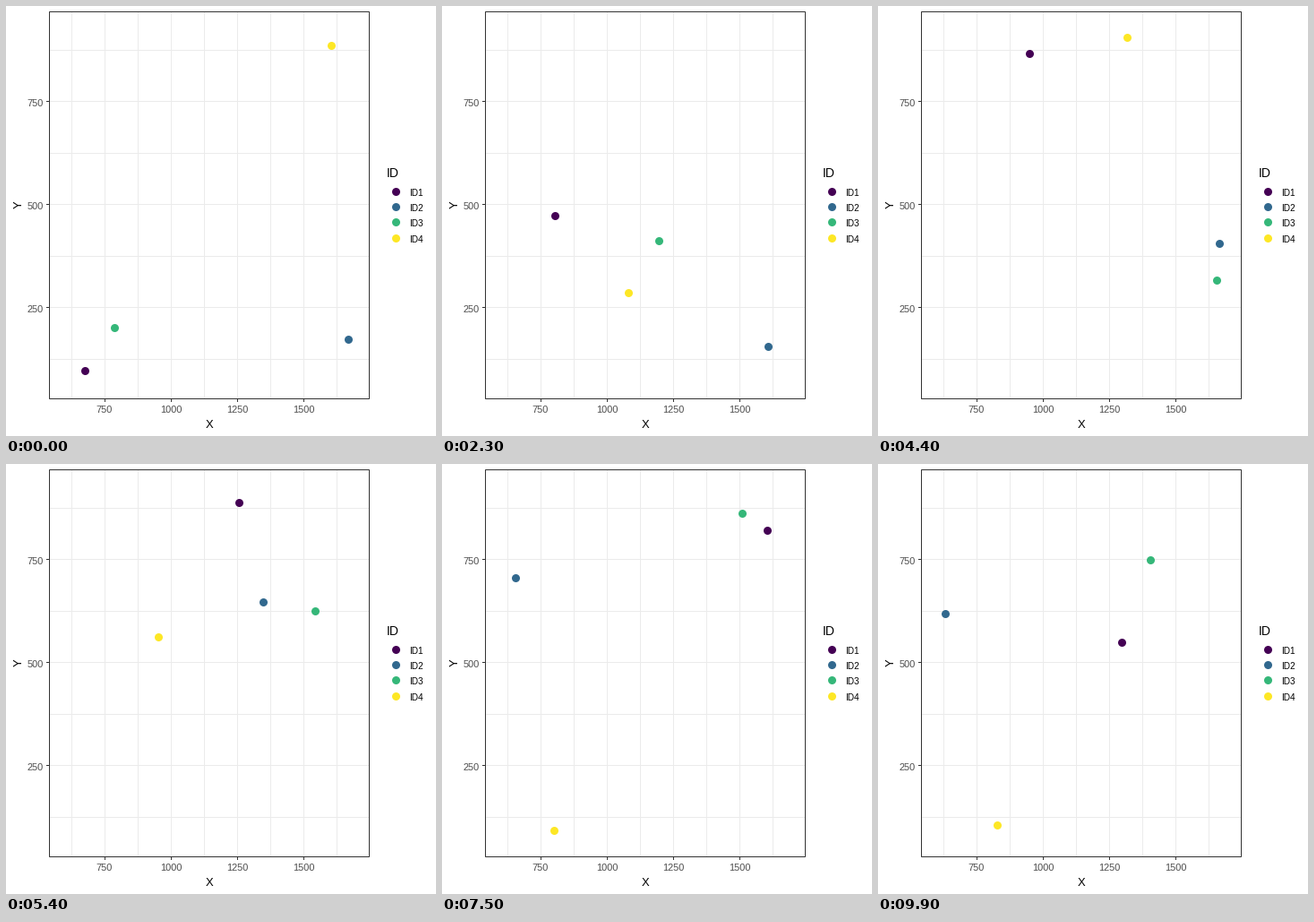
These frames come from a looping animation (480 by 480 pixels, 10000 ms). A matplotlib script:

```python
import numpy as np
import matplotlib.pyplot as plt
from matplotlib.animation import FuncAnimation
from matplotlib.patches import Circle, Rectangle

SIZE, DPI = 480, 72
FRAMES, INTERVAL = 100, 100
GRID, DARK, TICK_TEXT = "#EBEBEB", "#333333", "#4D4D4D"
LEFT, RIGHT, TOP, BOTTOM = 48, 405, 6, 438

# Each dot glides from stop to stop; all rest for a moment at the last but one.
TIMES = [0, 14, 32, 44, 62, 75, 84, 89, 99]
STOPS = [0, 1, 2, 3, 4, 5, 6, 6, 7]
PATHS = {
    "#440154": [(88, 407), (94, 414), (158, 55), (169, 53),
                (332, 35), (363, 74), (355, 68), (272, 199)],
    "#31688E": [(382, 372), (365, 381), (363, 379), (381, 265),
                (211, 65), (82, 127), (80, 140), (75, 167)],
    "#35B779": [(121, 359), (129, 357), (355, 166), (378, 306),
                (318, 50), (335, 55), (294, 89), (304, 107)],
    "#FDE725": [(363, 44), (107, 353), (310, 286), (278, 35),
                (84, 320), (125, 409), (132, 403), (133, 403)],
}

plt.rcParams["font.family"] = "Liberation Sans"
fig = plt.figure(figsize=(SIZE / DPI, SIZE / DPI), dpi=DPI, facecolor="white")
ax = fig.add_axes([0, 0, 1, 1])
ax.set(xlim=(0, SIZE), ylim=(SIZE, 0))
ax.axis("off")


def line(xs, ys, color):
    """Line from the first to the last pixel, both included."""
    ax.plot(xs, ys, color=color, lw=1, solid_capstyle="projecting")


def label(x, y, text, size, color="black", **kw):
    ax.text(x, y, text, fontsize=size, color=color, **kw)


def centre(x, y):
    """Middle of the nearest pixel."""
    return np.round(x) + 0.5, np.round(y) + 0.5


def dot(x, y, color):
    return ax.add_patch(Circle(centre(x, y), 4.5, color=color, lw=0, zorder=4))


def draw_panel():
    for k in range(9):
        x = 73 + 37 * k
        line([x, x], [TOP + 1, BOTTOM - 1], GRID)
    for k in range(7):
        y = int(49 + 57.5 * k)
        line([LEFT + 1, RIGHT - 1], [y, y], GRID)
    ax.add_patch(Rectangle((LEFT, TOP), RIGHT - LEFT, BOTTOM - TOP,
                           fill=False, ec=DARK, lw=1, zorder=3))

    for k in range(4):
        x = 110 + 74 * k
        line([x, x], [BOTTOM + 1, BOTTOM + 3], DARK)
        label(x, 454, str(750 + 250 * k), 11, TICK_TEXT, ha="center")
    for k in range(3):
        y = 106 + 115 * k
        line([LEFT - 3, LEFT - 1], [y, y], DARK)
        label(42, y + 6, str(750 - 250 * k), 11, TICK_TEXT, ha="right")

    label(227, 471, "X", 13, ha="center")
    label(14.5, 221.5, "Y", 13, rotation=90, ha="center", va="center")


def draw_legend():
    label(424.5, 191, "ID", 14)
    for i, color in enumerate(PATHS):
        y = int(207.3 + 17.28 * i)
        dot(435, y, color)
        label(450.5, y + 5, f"ID{i + 1}", 10)


draw_panel()
draw_legend()
tracks = [np.array(path)[STOPS].T for path in PATHS.values()]
dots = [dot(0, 0, color) for color in PATHS]


def update(n):
    for d, (x, y) in zip(dots, tracks):
        d.center = centre(np.interp(n, TIMES, x), np.interp(n, TIMES, y))
    return dots


anim = FuncAnimation(fig, update, frames=FRAMES, interval=INTERVAL,
                     repeat=True, repeat_delay=0, blit=False)
plt.show()
```
